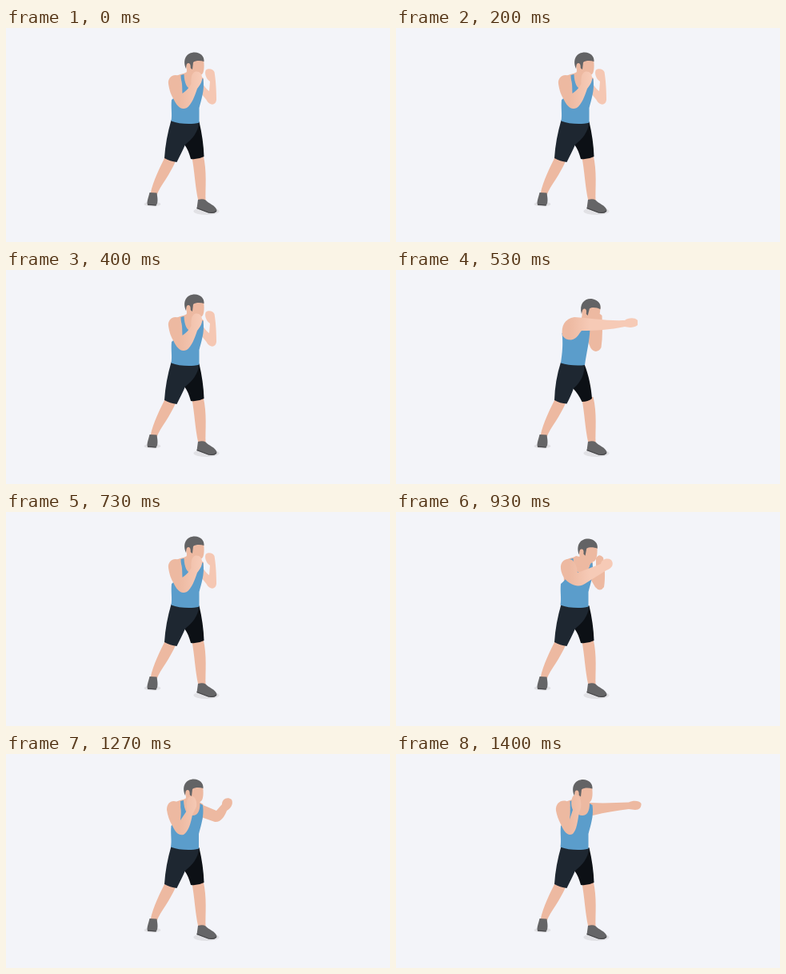
An HTML page without scripts that plays this animation: 480x268 px, repeating every 1.59 s.

```html
<!DOCTYPE html>
<html lang="en">
<head>
<meta charset="utf-8">
<title>Boxing combination</title>
<style>
  html, body { margin: 0; width: 100%; height: 100%; overflow: hidden; background: #f3f4f9; }
  svg { display: block; width: 100%; height: 100%; }

  .skin { fill: #edb9a1; }
  .light { fill: #f5c7b3; }
  .lit { fill: url(#lit); }
  .hair { fill: #636365; }
  .vest { fill: #5b9dcb; }
  .near-short { fill: #1e2731; }
  .far-short { fill: #0c1015; }
  .shoe { fill: #656567; }
  .sole { fill: none; stroke: #48484b; stroke-width: 1.2; }
  .shadow { fill: #e1e1e5; }

  .pose { opacity: 0; animation: 1590ms step-end infinite; }
  .guard { animation-name: guard; }
  .reach { animation-name: reach; }
  .cross { animation-name: cross; }
  .push { animation-name: push; }
  .jab { animation-name: jab; }

  @keyframes guard {
    0%, 12.5%, 25.1%, 45.9%, 62.8%, 75.4% { opacity: 1; }
    4.4%, 16.9%, 29.5%, 50.3%, 67.2%, 79.8%, 100% { opacity: 0; }
  }
  @keyframes reach {
    4.4%, 20.7%, 29.5%, 50.3%, 58.4% { opacity: 1; }
    0%, 8.8%, 25.1%, 33.3%, 54.7%, 62.8%, 100% { opacity: 0; }
  }
  @keyframes cross {
    8.8%, 16.9%, 33.3%, 54.7%, 67.2% { opacity: 1; }
    0%, 12.5%, 20.7%, 45.9%, 58.4%, 75.4%, 100% { opacity: 0; }
  }
  @keyframes push {
    79.8% { opacity: 1; }
    0%, 88%, 100% { opacity: 0; }
  }
  @keyframes jab {
    88%, 100% { opacity: 1; }
    0% { opacity: 0; }
  }
</style>
</head>
<body>
<svg viewBox="0 0 480 268" preserveAspectRatio="none">
  <defs>
    <linearGradient id="lit" gradientUnits="userSpaceOnUse" x1="216" x2="242">
      <stop stop-color="#edb9a1"/>
      <stop offset="1" stop-color="#f6cab6"/>
    </linearGradient>
    <g id="head">
      <path class="skin" d="M226 46 L230 38 L247 39 C248 47 248 55 245 58 C242 60 240 60 239 66 L224 66 C226 59 226 54 226 46Z"/>
      <path class="hair" d="M225 51 C220 39 226 30.500 236 30.500 C243 31 248 35 247.500 42 C243 40.500 237 40.500 234 43 L233 52 L230.500 50 C229 45 226 45 225 51Z"/>
      <ellipse class="skin" cx="228" cy="48.500" rx="2.700" ry="4.500"/>
    </g>
    <g id="torso">
      <path class="skin" d="M210 62 C216 57 222 58 226 55 L239 58 L247 63 L246 82 L211 88Z"/>
      <path class="vest" d="M218.500 59 L222.500 58 C223 69 226 77 234 77 C240 77 243 71 243 62 L246.500 64 C248.500 78 244 90 241.500 100 L241.500 118.500 C231 121.500 216 120 206.500 116.500 C208 108 206 100 207 90 C215 84 220 74 218.500 59Z"/>
    </g>
    <g id="shorts">
      <path class="far-short" d="M222 118 L241.500 117.500 C245 132 247 147 247.500 161 Q240 165 231 164 C229 157 227 151 223 146Z"/>
      <path class="near-short" d="M206.500 115.500 C217 119 231 119 241.500 117.500 C240 131 233 139 224 146 C221 153 217 161 213.500 168 Q205 167 198 163 C199 147 202 131 206.500 115.500Z"/>
    </g>
  </defs>

  <ellipse class="shadow" cx="183" cy="220.500" rx="10.500" ry="3"/>
  <ellipse class="shadow" cx="250.500" cy="229.500" rx="16" ry="4.500"/>
  <path class="skin" d="M199 161 C193 174 184 190 180.500 208 L188.500 209 C193 197 206 183 213 164Z"/>
  <path class="skin" d="M232 160 C236 180 236 197 240.500 217 L249.500 217 C249 200 251.500 180 246.500 159Z"/>
  <path class="shoe" d="M179.500 206 L188.500 206.500 C189.500 213 190.500 219 187.500 222.500 L177.500 222 C175 219 178 213 179.500 206Z"/>
  <path class="sole" d="M177 221 L187.500 222"/>
  <path class="shoe" d="M240 215 Q246 213.500 249.500 215.500 C253 220 262 222 263.500 228 C263.500 232 257 232.500 253 231.500 L238.500 226Z"/>
  <path class="sole" d="M238.500 225.500 L253 231 Q260 232.500 263 229"/>

  <g class="pose guard">
    <use href="#shorts"/>
    <path class="light" d="M244 66 C248 74 251 77 254 79 L255 67 C249 63 248 55 250 52.500 C253 50 259 51 260.500 55 C262 64 263 76 263 90 C262 98 254 97 250.500 90 L244 82Z"/>
    <use href="#torso"/>
    <use href="#head"/>
    <path class="lit" d="M203 70 C202 62 209 57 216 60 C221 65 220 73 220.500 82 C225 79 229 75 231.500 70 C231 62 232 56 237 54.500 C243 54 246 59 245 65 C244 70 241 73 239 76 C236 85 232 96 226 100 C218 104 213 96 210 90 C206 84 204 77 203 70Z"/>
  </g>

  <g class="pose reach">
    <use href="#shorts"/>
    <path class="skin" d="M244 68 L250 76 L250 58 Q254 51 259 57 C261 68 262 82 260 94 Q255 101 249 94 L242 82Z"/>
    <use href="#torso" transform="translate(-1)"/>
    <use href="#head" transform="translate(4 3) rotate(4 236 46)"/>
    <path class="lit" d="M206 71 C205 61 213 57 220 60 C226 65 226 71 227 76 L256 65 C257 59 264 57 269 60 C273 65 270 71 263 73 L239 88 C231 94 225 93 219 90 C211 86 207 79 206 71Z"/>
  </g>

  <g class="pose cross">
    <path class="far-short" d="M222 117 L235.500 118 C241 132 244 147 245 161 Q240 165 232.500 165 C229 158 226 153 221 148Z"/>
    <path class="near-short" d="M206 115.500 C215 118 227 119 235.500 118 C236 130 231 141 222 148 C220 154 217 161 213.500 167.500 Q205 167 198 163 C198.500 147 201 131 206 115.500Z"/>
    <path class="skin" d="M241 70 L248 72 L249 56 Q254 53 257.500 57 C258 70 258.500 84 256.500 97 C253 104 246 103 243 97 L239 87Z"/>
    <path class="vest" d="M207.500 79 L228 72 L242.500 73 C242 89 238 104 236 119 C226 120.500 214 119 206 116.500 C208 103 209 92 207.500 79Z"/>
    <use href="#head" transform="translate(7.500 5.500) rotate(8 236 46)"/>
    <path class="lit" d="M208 82 C206 70 211 61 223 59 C241 60 264 64 286 63 C290 60 298 59 302 63 L302 69 C297 73 290 72 286 71 C268 75 248 76 232 76 C229 79 227 86 219 87.500 Q211 87.500 208 82Z"/>
  </g>

  <g class="pose push">
    <use href="#shorts"/>
    <path class="skin" d="M244 63 L263 71 L270 63 C270 56 277 53 282 57 C285 63 280 69 276 71 C273 79 268 86 261 85 L244 79Z"/>
    <use href="#torso" transform="translate(-.5)"/>
    <use href="#head" transform="translate(-1 1)"/>
    <path class="lit" d="M201 70 C201 61 207 57 214 60 C220 64 219 74 218 83 L226 71 C225 61 226 54 231 53 C237 52 239 60 238 66 L233 76 C231 87 228 97 222 101 C215 103 211 96 208 90 C204 83 202 77 201 70Z"/>
  </g>

  <g class="pose jab">
    <use href="#shorts"/>
    <path class="skin" d="M243 61 C260 62 277 61 291 60.500 C296 58 304 58 306.500 62 C307 67 304 70 299 70 L291 69 C276 71 262 73 246 77 L241 76Z"/>
    <use href="#torso" transform="translate(-1)"/>
    <use href="#head" transform="translate(-2 1.500)"/>
    <path class="lit" d="M200 71 C199 62 206 57 213 59 C219 63 218 74 217 82 L221 70 C218 63 219 55 222 52 C226 49 230 53 231 59 C232 65 231 69 229 73 C227 84 226 95 221 100 C214 104 209 95 206 88 C203 82 201 77 200 71Z"/>
  </g>
</svg>
</body>
</html>
```
